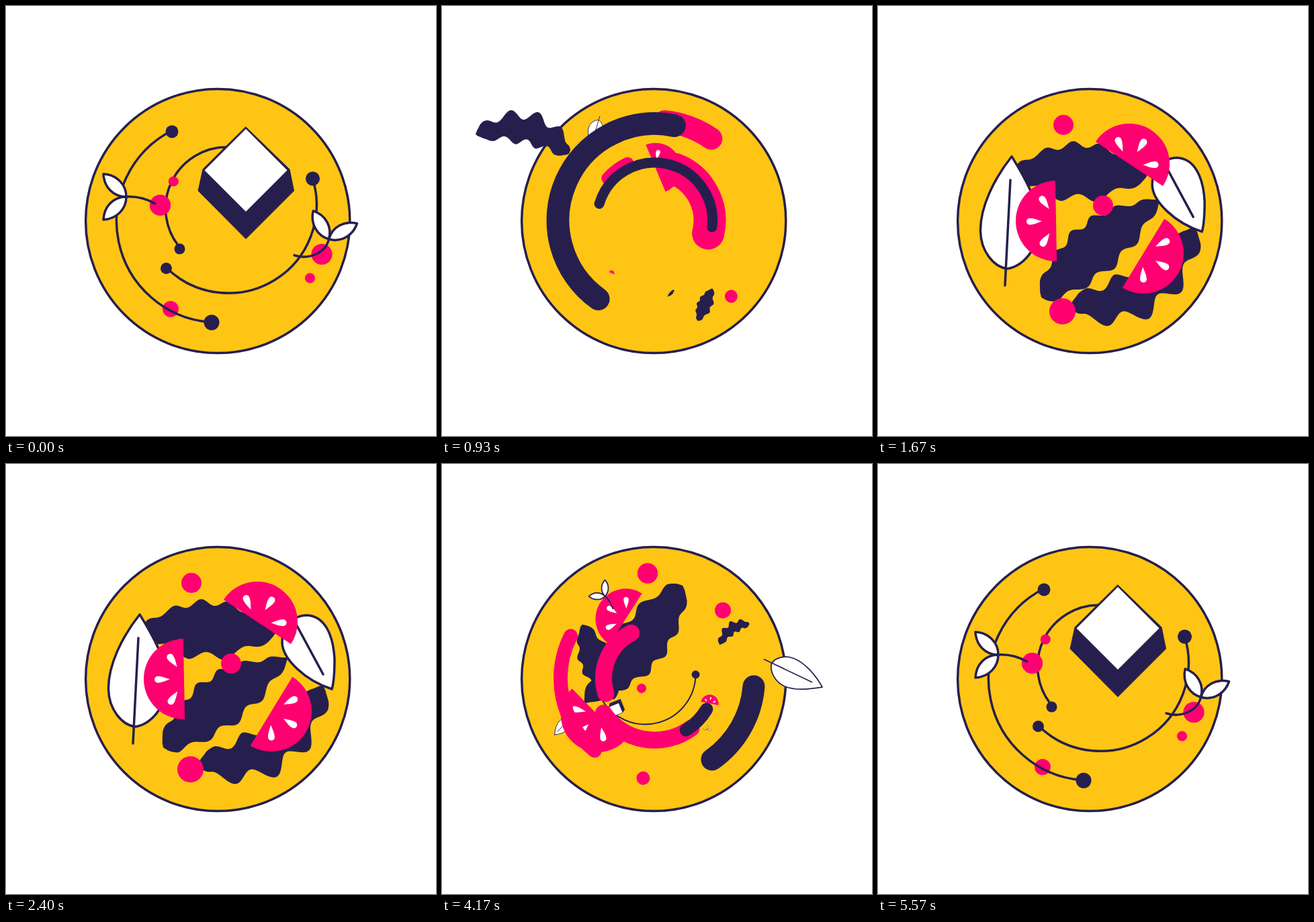
Write an HTML page that moves like this. It is 640 px wide and 640 px high and loops after 6730 ms.

```html
<!DOCTYPE html>
<html lang="en">
<head>
<meta charset="utf-8">
<title>Plate swirl</title>
<style>
html, body { margin: 0; width: 100%; height: 100%; overflow: hidden; background: #fff; }
svg { display: block; width: 100vw; height: 100vh; }
</style>
</head>
<body>
<svg id="stage" viewBox="0 0 640 640"></svg>
<script>
const LOOP = 6730, CX = 315.5, CY = 320;
const NAVY = '#261f4e', PINK = '#ff0071', GOLD = '#ffc514';
const stage = document.getElementById('stage');
const rad = Math.PI / 180;

function el(tag, attrs, parent) {
  const node = document.createElementNS('http://www.w3.org/2000/svg', tag);
  for (const k in attrs) node.setAttribute(k, attrs[k]);
  parent.appendChild(node);
  return node;
}
const line = { fill: 'none', stroke: NAVY, 'stroke-width': 3.5, 'stroke-linecap': 'round', 'stroke-linejoin': 'round' };
const leafStyle = { ...line, fill: '#fff' };
const path = (d, style) => g => el('path', { d, ...style }, g);
const disc = (cx, cy, r, fill) => g => el('circle', { cx, cy, r, fill }, g);

function arcPath(cx, cy, r, a0, a1) {
  const at = a => (cx + r * Math.cos(a * rad)).toFixed(2) + ' ' + (cy + r * Math.sin(a * rad)).toFixed(2);
  return `M${at(a0)}A${r} ${r} 0 ${a1 - a0 > 180 ? 1 : 0} 1 ${at(a1)}`;
}

// Ruffled shape around a bent spine; each edge has a width, wave count, first crest and ruffle depth
function lettuce([x0, y0], [x1, y1], [x2, y2], cap0, cap1, upper, lower) {
  const edge = (x, side, [width, waves, crest, depth]) => {
    const v = 1 - x, belly = Math.max(0, Math.sin(Math.PI * x));
    const round = Math.sqrt(Math.min(1, x / 0.06, v / 0.06));
    const d = side * (width * belly + (cap0 * v + cap1 * x) * round
      + depth * Math.sqrt(belly) * Math.cos(2 * Math.PI * waves * (x - crest)));
    const px = v * v * x0 + 2 * v * x * x1 + x * x * x2, py = v * v * y0 + 2 * v * x * y1 + x * x * y2;
    const dx = v * (x1 - x0) + x * (x2 - x1), dy = v * (y1 - y0) + x * (y2 - y1), len = Math.hypot(dx, dy);
    return (px + d * dy / len).toFixed(1) + ' ' + (py - d * dx / len).toFixed(1);
  };
  const n = 70, points = [];
  for (let i = 0; i <= n; i++) points.push(edge(i / n, 1, upper));
  for (let i = n; i >= 0; i--) points.push(edge(i / n, -1, lower));
  return path('M' + points.join('L') + 'Z', { fill: NAVY });
}

function tomato(x, y, turn) {
  return g => {
    const t = el('g', { transform: `translate(${x} ${y}) rotate(${turn})` }, g);
    el('path', { d: 'M0-60A60 60 0 0 1 0 60Z', fill: PINK }, t);
    for (const k of [-1, 0, 1])
      el('path', {
        d: 'M0 0C6-2 12-5 18-5A5 5 0 0 1 18 5C12 5 6 2 0 0Z', fill: '#fff',
        transform: `translate(${21 - 11 * k * k} ${18 * k}) rotate(${56 * k})`
      }, t);
  };
}

// Two leaves mirrored about the x axis, joined at 0,0
function leafPair(g, x, y, turn) {
  const t = el('g', { transform: `translate(${x} ${y}) rotate(${turn})` }, g);
  for (const k of [1, -1])
    el('path', { d: 'M0 0C19 0 33 14 34 34C14 33 0 18 0 0Z', transform: `scale(1 ${k})`, ...leafStyle }, t);
}

// Monotone cubic through column j of the keys
function sample(keys, j, t) {
  const n = keys.length;
  if (t <= keys[0][0]) return keys[0][j];
  if (t >= keys[n - 1][0]) return keys[n - 1][j];
  let i = 0;
  while (t >= keys[i + 1][0]) i++;
  const sec = k => (keys[k + 1][j] - keys[k][j]) / (keys[k + 1][0] - keys[k][0]);
  const slope = k => {
    if (k === 0 || k === n - 1) return 0;
    const a = sec(k - 1), b = sec(k);
    return a * b <= 0 ? 0 : 2 * a * b / (a + b);
  };
  const h = keys[i + 1][0] - keys[i][0], u = (t - keys[i][0]) / h, v = 1 - u;
  return keys[i][j] * v * v * (1 + 2 * u) + keys[i + 1][j] * u * u * (3 - 2 * u)
    + h * u * v * (slope(i) * v - slope(i + 1) * u);
}

const items = [];
function add(x, y, keys, shapes) {
  const g = el('g', {}, stage);
  shapes.forEach(draw => draw(g));
  items.push({ g, x, y, keys, ang: Math.atan2(y - CY, x - CX) / rad, r: Math.hypot(x - CX, y - CY) });
}

// A pose is orbit angle, scale and radius change; a key adds the item's own turn
const key = (t, orbit, scale = 1, drift = 0, turn = orbit) => [t, orbit, scale, drift, turn];
const rest = t => key(t, 0);

// Salad parts turn faster than they orbit, the more so the smaller they are
function salad(x, y, [o1, s1, d1], [o2, s2, d2], shapes, [swing, lean] = [0, 0]) {
  const t1 = o1 + 180 * (1 - s1), t2 = o2 - 130 * (1 - s2);
  add(x, y, [
    key(700, o1 * 1.4, 0, d1, t1 * 1.4), key(930, o1, s1, d1, t1),
    key(1090, o1 * 0.55, (s1 + 1) / 2, d1 * 1.1, t1 * 0.55),
    key(1430, swing - 2, 1, lean), key(1650, swing, 1, lean), rest(2150),
    rest(3630), key(4170, o2, s2, d2, t2), key(4360, o2 * 1.4, 0, d2, t2 * 1.4)
  ], shapes);
}

// Dessert parts leave in a quick spiral, one after another, and wind back in
let order = 0;
function dessert(x, y, [o1, s1, d1], [o2, s2, d2], shapes, spin = 1) {
  const lag = (order++ % 5) * 14, over = spin > 1 ? -2 : 0;
  add(x, y, [
    rest(30), key(400 + lag, -70, 0.85, -8), key(680 + lag, -220, 0, -25, -300),
    key(3960, o1 * 1.4, 0, d1), key(4170, o1, s1, d1), key(4530, o2, s2, d2, o2 * spin),
    key(5000, over, 1, 0, over * 3), rest(5540)
  ], shapes);
}

el('rect', { width: 640, height: 640, fill: '#fff' }, stage);
el('circle', { cx: 315.2, cy: CY, r: 196.6, fill: GOLD, stroke: NAVY, 'stroke-width': 3.5 }, stage);

salad(300, 246, [161, 0.26, 70], [-62, 0.6, 12], [
  lettuce([200, 247], [300, 247], [402, 250], 8, 8, [34, 5, 0.245, 5], [31, 3.55, 0.35, 7])]);
salad(325, 357, [362, 0.06, 72], [-194, 1, 23], [
  lettuce([234, 422], [328, 355], [420, 288], 13, 3, [36, 6, 0.25, 5], [22, 4.6, 0.265, 6])], [-4, 7]);
salad(383, 412, [161, 0.65, 112], [-85, 0.25, 25], [
  lettuce([287, 445], [400, 440], [472, 330], 14, 12, [10, 4, 0.36, 8], [27, 4.2, 0.2, 12])]);

salad(194, 320, [57, 0.24, 38], [-182, 0.5, 86], [
  path('M199 224C172 258 152 300 152.5 335C153 365 172 388 192 391C215 388 238 362 240 330C240 290 215 250 199 224Z', leafStyle),
  path('M197 259L189 416', line)]);
salad(449, 280, [200, 0, 20], [-190, 0.25, 15], [
  path('M485 335C445 322 411 290 411 265C411 240 428 226 447 225C475 226 487 255 489 290C489 310 488 325 485 335Z', leafStyle),
  path('M431 237L472 313', line)], [0, -3]);

salad(374, 235, [185, 0.07, -3], [-157, 0.92, -4], [tomato(374, 235, -56.6)]);
salad(265, 320, [92, 0.63, 28], [-156, 0.22, 40], [tomato(265, 320, 179)]);
salad(395, 368, [150, 0, 0], [-146, 0.75, 6], [tomato(395, 368, 31.4)]);

salad(276, 177, [35, 1, 0], [-158, 0.67, 0], [disc(276, 177, 15, PINK)]);
salad(335, 297, [180, 0, 0], [-167, 0.47, -7], [disc(335, 297, 15, PINK)]);
salad(274.5, 454.5, [298, 0.49, 20], [-200, 0.78, 17], [disc(274.5, 454.5, 19.5, PINK)]);

// Parts that stay under the swooshes until late
const hidden = [[90, 0, -40], [30, 0, -30]];
const ring = (cx, cy, r, a0, a1) => path(arcPath(cx, cy, r, a0, a1), line);

dessert(245, 451, [197, 1, -4], [147, 1, 0], [disc(245, 451, 12, PINK)]);
dessert(CX, CY, [90, 0, 0], [14, 0.75, 0], [ring(CX, CY, 151, 94, 243)]);
dessert(247, 187, ...hidden, [disc(247, 187, 9.5, NAVY)]);
dessert(306, 471, ...hidden, [disc(306, 471, 11.5, NAVY)]);
dessert(328.5, 301, [60, 0, 0], [15, 1, 0], [ring(328.5, 301, 91, 139, 272), disc(258.5, 361.5, 8, NAVY)]);
dessert(456.5, 257, [18, 0.57, -92], [11, 0.875, -17.5], [
  ring(331, 296, 131.3, -17, 134), disc(238.5, 390.5, 8.5, NAVY), disc(456.5, 257, 10.5, NAVY)]);
dessert(249.3, 261, ...hidden, [disc(249.3, 261, 7.6, PINK)]);
dessert(229.5, 296.5, ...hidden, [disc(229.5, 296.5, 15.7, PINK)]);
dessert(470, 369.5, [75, 0, -20], [28.5, 1, 0], [disc(470, 369.5, 15.6, PINK)]);
dessert(452.5, 405, [75, 0, -20], [28.5, 1, 0], [disc(452.5, 405, 7.6, PINK)]);

// Cube
dessert(357, 243.5, [203, 0.17, -14], [9.7, 1, 0], [
  path('M293 243L286 275L357 346.5L428.5 275L422 243L357 180Z', { ...line, fill: NAVY, 'stroke-width': 1 }),
  path('M357 183L418.5 244.5L357 306L295.5 244.5Z', { fill: '#fff' })]);

// Sprigs
dessert(179, 284, [44.7, 0.5, 2], [25.7, 1, -12], [
  path('M179 284C195 283 209 287 221.5 294', line), g => leafPair(g, 179, 284, 180)], 2.6);
dessert(480.5, 347, [34, 0.12, -58], [16.5, 1, 10], [
  path('M480.5 347C476 368 450 378 429 371', line), g => leafPair(g, 480.5, 347, -74)], 2.2);

// Rings that swell to full length and weight at time t while sweeping round
const swooshes = [];
function burst(t, life, arcs) {
  for (const [stroke, r, w, a0, a1] of arcs)
    swooshes.push({ t, life, r, w, mid: (a0 + a1) / 2, half: (a1 - a0) / 2, node: el('path', { ...line, stroke }, stage) });
}
burst(930, 280, [[PINK, 148, 33, 276, 305], [PINK, 82, 48, 292, 374], [PINK, 94, 18, 222, 245],
  [NAVY, 144, 34, 126, 282], [NAVY, 86, 15, 197, 367]]);
burst(4170, 200, [[PINK, 140, 21, 130, 207], [PINK, 76, 25, 163, 243], [PINK, 92, 25, 54, 146],
  [NAVY, 90, 19, 31, 59], [NAVY, 148, 33, 5, 55]]);
burst(4530, 290, [[PINK, 147, 29, 258, 272], [PINK, 82, 40, 215, 305],
  [NAVY, 83, 43, 130, 298], [NAVY, 146, 32, 95, 159]]);

function render(t) {
  for (const { g, x, y, keys, ang, r } of items) {
    const [orbit, scale, drift, turn] = [1, 2, 3, 4].map(j => sample(keys, j, t));
    g.style.display = scale > 0.004 ? '' : 'none';
    const a = (ang + orbit) * rad, d = r + drift;
    g.setAttribute('transform',
      `translate(${CX + d * Math.cos(a)} ${CY + d * Math.sin(a)}) rotate(${turn}) scale(${scale}) translate(${-x} ${-y})`);
  }
  for (const s of swooshes) {
    const u = (t - s.t) / s.life, on = Math.abs(u) < 1;
    s.node.style.display = on ? '' : 'none';
    if (!on) continue;
    const k = Math.cos(u * Math.PI / 2) ** 2;
    const mid = s.mid - 0.3 * (t - s.t), half = s.half * k + 0.05;
    s.node.setAttribute('d', arcPath(316.5, 319, s.r, mid - half, mid + half));
    s.node.setAttribute('stroke-width', s.w * Math.sqrt(k));
  }
}

const start = performance.now();
function tick(now) {
  render(Math.max(0, now - start) % LOOP);
  requestAnimationFrame(tick);
}
render(0);
requestAnimationFrame(tick);
</script>
</body>
</html>
```
